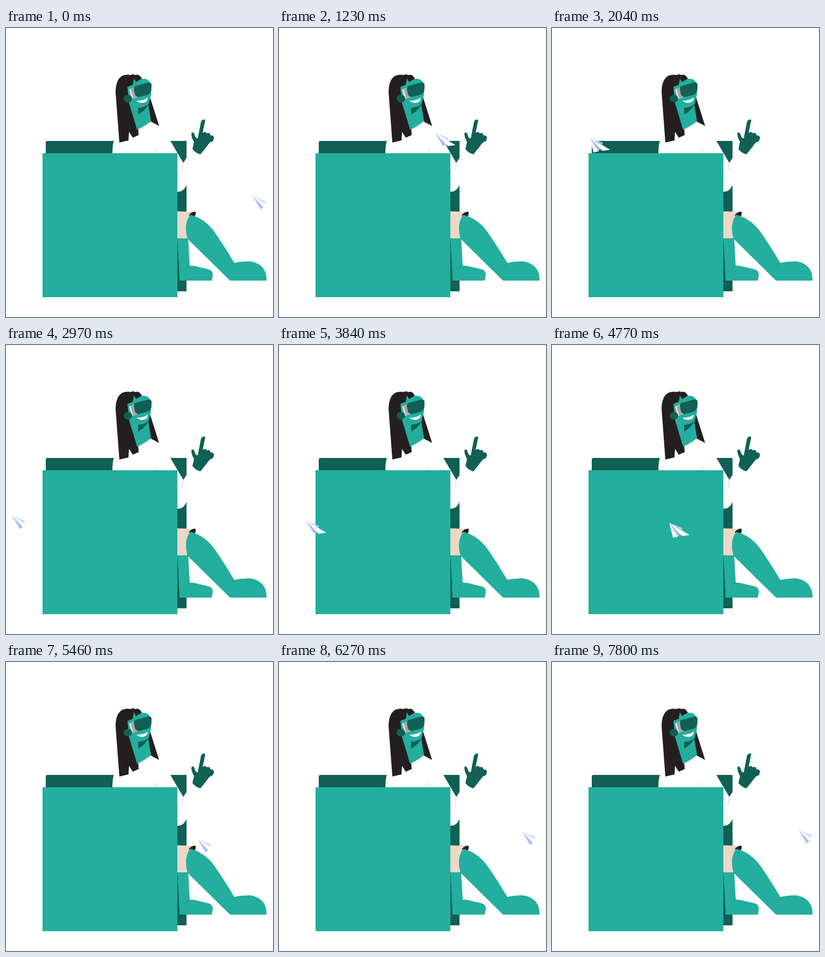
Write an HTML page that moves like this. It is 497 px wide and 540 px high and loops after 8000 ms.

```html
<!DOCTYPE html>
<html lang="en">
<head>
<meta charset="utf-8">
<title>Paper plane</title>
<style>
  html, body { margin: 0; width: 100%; height: 100%; overflow: hidden; background: #fff; }
  .scene { display: block; width: 100%; height: 100%; }
  .dark { fill: #116054; }
  .teal { fill: #23ae9e; }
  .hair { fill: #231f20; }
  .white { fill: #fff; }
  .crease { fill: none; stroke: #c9c9c9; }
  .fold { fill: none; stroke: #1c9486; stroke-width: .8; }

  .plane {
    --out: path("M459 314C405 272 345 220 291 196C237 172 131 168 66 207C16 237 2 290 13 327");
    --back: path("M13 327C130 328 400 345 459 314");
    position: absolute; left: 0; top: 0; width: 40px; height: 30px;
    offset-anchor: 0 0;
    offset-rotate: 0deg;
    animation: fly 8s infinite;
  }
  /* over the desk to the left, then back along the front, then rest */
  @keyframes fly {
    0% { offset-path: var(--out); offset-distance: 0%; animation-timing-function: cubic-bezier(.35, 0, .55, 1); }
    40.874% { offset-path: var(--out); offset-distance: 100%; animation-timing-function: step-end; }
    40.875% { offset-path: var(--back); offset-distance: 0%; animation-timing-function: cubic-bezier(.333, 0, .63, 1); }
    81.75%, 100% { offset-path: var(--back); offset-distance: 100%; }
  }
</style>
</head>
<body>
<svg class="scene" viewBox="0 0 497 540">
  <!-- desk back and shirt -->
  <path class="dark" d="M76 211H336V492H74V213Z"/>
  <path class="white" d="M198 235Q198 216 202 208L245 190L285 181Q300 190 306 211L330 252L336 243V293Q331 306 319 306V235Z"/>
  <path class="crease" d="M278 225Q279 230 281 235M329.500 252Q330 259 327.500 267"/>

  <!-- legs -->
  <path class="teal" d="M319 392H339L342 444Q352 444 360 447L374 450Q385 452 385 461L383 472H323Z"/>
  <path class="dark" d="M319 392L323 472H319Z"/>
  <path d="M319 342.500L349 343.500L343 349Q334 362 337 393H319Z" fill="#ecd8c6"/>
  <path class="hair" d="M340 350Q346 342 353 343.500Q354 349 350 354Z"/>
  <path class="teal" d="M343 349Q370 356 388 381Q406 407 425 439Q436 436 455 436Q473 439 480 451Q485 458 485 472H417L338 394Q330 366 343 349Z"/>
  <path class="fold" d="M425 440Q420 443 417 448M342 444Q337 446 334 452"/>

  <!-- desk front -->
  <path class="teal" d="M68 234H319V503H68Z"/>

  <!-- head -->
  <path class="hair" d="M204 120Q204 96 217 89Q225 86 232 88Q236 85 241 88Q248 85 253 95L262 110L285 183L268 174L246 188L247 200L236 205L229 194L228 210L211 214Z"/>
  <path class="teal" d="M226 110L236 106L238 94L242 101L252 95Q264 93 269 103L270 124L265 144L270 174Q258 184 244 190L229 140Z"/>
  <path class="dark" d="M246 149Q257 149 265 142Q261 153 246 162Z"/>
  <path class="white" d="M243 136Q256 136 264 130Q264 139 254 140Q247 140 243 136Z"/>
  <path d="M229 115L239 111L245 129L234 133Z" fill="#e3e3e3"/>
  <path d="M232 114L238 112L243 130L237 132Z" fill="#a7a5a5"/>
  <ellipse class="dark" cx="227" cy="132" rx="8" ry="7"/>
  <path class="dark" d="M242 108L264 102Q270 101 271 106L270.500 117Q269 122 263 125L247 129Q242 129 240 124L238 114Q238 109 242 108Z"/>

  <!-- hand -->
  <path class="dark" d="M347 226L350 213Q345 204 345 197Q348 192 351 199Q353 207 357 206L363 175Q366 169 371 172L366 196Q371 192 374 197Q379 194 381 201Q387 200 387 206Q386 213 381 213Q377 216 374 221L362 236Q353 234 347 226Z"/>
</svg>

<svg class="plane" viewBox="0 0 40 30">
  <path class="white" d="M0 0L7 28L16 26L19 21L24 25L38 23Z"/>
  <path fill="#a9bcf9" d="M0 0L15 25L20 21Z"/>
  <path fill="#c3d0fb" d="M0 0L24 10L24 13.500Z"/>
</svg>
</body>
</html>
```
